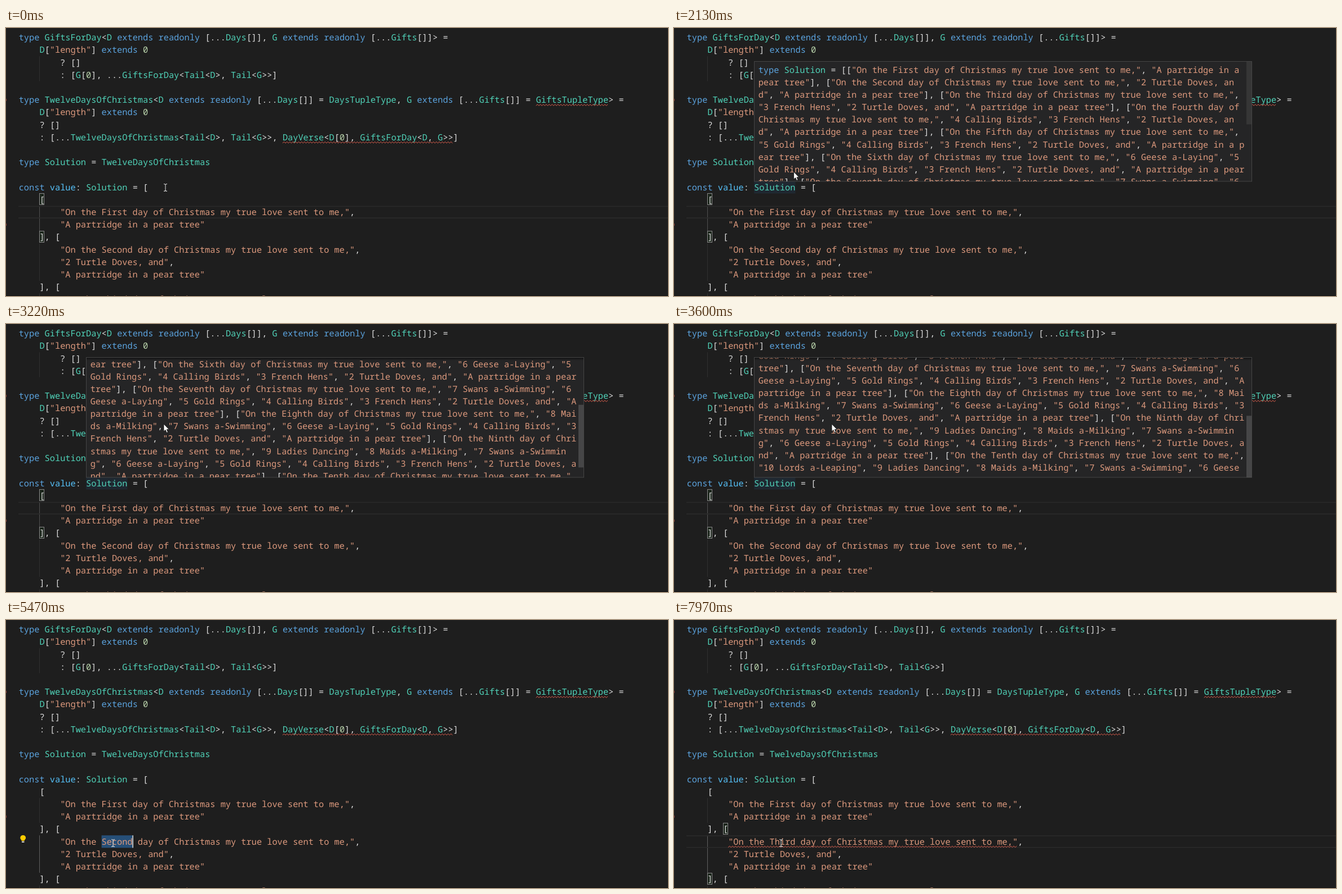
Animation, 1175 px wide and 477 px high, one loop 8 s. Source, as an HTML page:

```html
<!DOCTYPE html>
<html lang="en">
<head>
<meta charset="utf-8">
<title>Typed verses</title>
<style>
html, body { margin: 0; width: 100%; height: 100%; overflow: hidden; background: #1e1e1e; }
svg { display: block; width: 1175px; height: 477px; }
text {
  font: 15.3px "Noto Sans Mono", "DejaVu Sans Mono", monospace;
  font-variant-ligatures: none;
  text-rendering: geometricPrecision;
  white-space: pre;
}
</style>
</head>
<body>
<svg id="stage" viewBox="0 0 1175 477" xmlns="http://www.w3.org/2000/svg">
  <defs>
    <clipPath id="popClip"><rect x="143" y="60" width="882" height="213"/></clipPath>
    <linearGradient id="fade" x2="0" y2="1">
      <stop stop-color="#000" stop-opacity=".5"/><stop offset="1" stop-color="#000" stop-opacity="0"/>
    </linearGradient>
  </defs>
  <rect width="1175" height="477" fill="#1e1e1e"/>
  <rect y="476" width="1175" height="1" fill="#111"/>
  <g id="back"></g>
  <g id="code"></g>
  <g id="front"></g>
  <g id="popup">
    <rect x="142.5" y="59.5" width="883" height="213.5" fill="#252526" stroke="#454545"/>
    <g clip-path="url(#popClip)">
      <g id="hint"></g>
      <rect id="shade" x="143" y="60" width="882" height="5" fill="url(#fade)"/>
      <rect id="thumb" x="1016" width="9" height="111.5" fill="#797979"/>
    </g>
  </g>
  <g id="beam" fill="none" stroke="#d4d4d4" stroke-width="1.1">
    <path d="M-3-6.5Q0-6.5 0-4.5V4.5Q0 6.5-3 6.5M3-6.5Q0-6.5 0-4.5M3 6.5Q0 6.5 0 4.5"/>
  </g>
  <path id="arrow" d="M0 0V13.2L3 10.5 5.2 15.4 7.4 14.4 5.3 9.7H9.4Z" fill="#fff" stroke="#111" stroke-width=".8"/>
</svg>
<script>
const $ = id => document.getElementById(id);
const LOOP = 8000, CW = 9.18, LH = 22.2, X0 = 22.7;
const colX = c => X0 + c * CW;
const rowY = r => 5.9 + r * LH;

function add(parent, tag, attrs) {
  const el = document.createElementNS('http://www.w3.org/2000/svg', tag);
  set(el, attrs);
  return parent.appendChild(el);
}
function set(el, attrs) { for (const k in attrs) el.setAttribute(k, attrs[k]); }
const show = (el, on) => set(el, { visibility: on ? 'visible' : 'hidden' });

// Syntax colours
const PLAIN = '#dcdcdc';
const RULES = [
  [/^"/, '#dc997d'],
  [/^(type|extends|readonly|const)$/, '#5ba3de'],
  [/^value$/, '#56c2fa'],
  [/^\d/, '#b9d3ab'],
  [/^[A-Z]/, '#50d2b8']
];
function colorize(src) {
  const out = [];
  for (const tok of src.match(/"[^"]*"?|\w+|[^\w"]+/g) || []) {
    const rule = RULES.find(([re]) => re.test(tok));
    for (const ch of tok) out.push([ch, rule ? rule[1] : PLAIN]);
  }
  return out;
}
function fillText(el, chars) {
  el.textContent = '';
  let span, last;
  for (const [ch, color] of chars) {
    if (color !== last) span = add(el, 'tspan', { fill: last = color });
    span.textContent += ch;
  }
}

// Verses
const ORDINALS = 'First Second Third Fourth Fifth Sixth Seventh Eighth Ninth Tenth'.split(' ');
const GIFTS = ['A partridge in a pear tree', '2 Turtle Doves, and', '3 French Hens', '4 Calling Birds',
  '5 Gold Rings', '6 Geese a-Laying', '7 Swans a-Swimming', '8 Maids a-Milking', '9 Ladies Dancing',
  '10 Lords a-Leaping'];
const opening = day => `"On the ${day} day of Christmas my true love sent to me,"`;
const pad = ' '.repeat(8);
const verseRow = day => pad + opening(day) + ',';
const tree = pad + `"${GIFTS[0]}"`;

const EDIT_ROW = 17;
const rows = [
  'type GiftsForDay<D extends readonly [...Days[]], G extends readonly [...Gifts[]]> =',
  '    D["length"] extends 0',
  '        ? []',
  '        : [G[0], ...GiftsForDay<Tail<D>, Tail<G>>]',
  '',
  'type TwelveDaysOfChristmas<D extends readonly [...Days[]] = DaysTupleType, G extends [...Gifts[]] = GiftsTupleType> =',
  '    D["length"] extends 0',
  '    ? []',
  '    : [...TwelveDaysOfChristmas<Tail<D>, Tail<G>>, DayVerse<D[0], GiftsForDay<D, G>>]',
  '',
  'type Solution = TwelveDaysOfChristmas',
  '',
  'const value: Solution = [',
  '    [',
  verseRow('First'),
  tree,
  '    ], [',
  verseRow('Second'),
  pad + `"${GIFTS[1]}",`,
  tree,
  '    ], [',
  verseRow('Third')
];
const rowEls = rows.map((src, r) => {
  const el = add($('code'), 'text', { x: X0, y: rowY(r) + 16.3 });
  fillText(el, colorize(src));
  return el;
});

// Hover text, wrapped between any two letters
const POP_W = 94, POP_LINES = 18, POP_LH = 22.13;
const verses = ORDINALS.map((day, i) =>
  '[' + [opening(day), ...GIFTS.slice(0, i + 1).reverse().map(g => `"${g}"`)].join(', ') + ']');
const hint = colorize('type Solution = [' + verses.join(', ') + ']');
const units = hint.map(c => c[0]).join('').match(/[\["]*[\w=]["\],-]*\s*/g);
const lines = [[]];
let at = 0;
for (const unit of units) {
  if (lines[lines.length - 1].length + unit.trimEnd().length > POP_W) lines.push([]);
  lines[lines.length - 1].push(...hint.slice(at, at += unit.length));
}
lines.slice(0, POP_LINES).forEach((chars, i) =>
  fillText(add($('hint'), 'text', { x: 149.7, y: 79.8 + i * POP_LH }), chars));

// Editor decorations
const back = $('back'), front = $('front');
const guide = (col, r0, r1) => add(back, 'rect',
  { x: Math.round(colX(col)), y: rowY(r0), width: 1, height: (r1 - r0) * LH, fill: '#303030' });
guide(4, 2, 4); guide(4, 21, 22);
const firstGuide = guide(4, 14, 16), secondGuide = guide(4, 17, 20);

const lineBox = add(back, 'path', { stroke: '#2a2a2a', 'stroke-width': 1.6, fill: 'none' });
const hoverBox = add(back, 'rect',
  { x: colX(13), y: rowY(12), width: 8 * CW, height: LH, fill: '#264f78', opacity: .22 });
const selection = add(back, 'rect',
  { x: colX(16), y: rowY(EDIT_ROW), width: 6 * CW, height: LH, fill: '#264f78' });

const bracket = (col, row) => add(back, 'rect', { x: Math.round(colX(col)) + .5, y: Math.round(rowY(row)) + .5,
  width: 8, height: 20, fill: '#0064001a', stroke: '#888' });
const firstPair = [bracket(4, 13), bracket(4, 16)];
const secondPair = [bracket(7, 16), bracket(4, 20)];

function wave(col, row, len) {
  const y = rowY(row) + LH - 3.2, end = colX(col + len);
  let d = '', up = false;
  for (let x = colX(col); x <= end; x += 2.6, up = !up)
    d += (d ? 'L' : 'M') + x.toFixed(1) + ' ' + (y + (up ? 0 : 2.4)).toFixed(1);
  return d;
}
const squiggle = d => add(front, 'path', { d, fill: 'none', stroke: '#e2604f', 'stroke-width': 1 });
squiggle(wave(100, 5, 14));
squiggle(wave(51, 8, 33));
const editWave = squiggle('');

for (const y of [126, 348]) add(front, 'rect', { y, width: 1, height: 4, fill: '#8a3a33' });
const caret = add(front, 'rect', { y: rowY(EDIT_ROW), width: 1.6, height: LH, fill: '#d4d4d4' });
const bulb = add(front, 'g', {});
add(bulb, 'path', { d: 'M27.8 393.2C27.8 391 25.3 390.5 25.3 387.8A4.9 4.9 0 0 1 35.1 387.8C35.1 390.5 32.6 391 32.6 393.2Z', fill: '#fc0' });
add(bulb, 'rect', { x: 28, y: 394, width: 4.4, height: 2, fill: '#d4d4d4' });

// Pointer path: start, end, steps, x, y, lift
const MOVES = [
  [120, 880, 11, 189, 284, 10],
  [2050, 2430, 6, 280, 176, 0],
  [3220, 3220, 1, 280, 178, 0],
  [4080, 4310, 4, 239, 356, 0],
  [4380, 4530, 3, 182, 414, 0],
  [4690, 4840, 3, 190, 397, 0]
];
function pointer(t) {
  let x = 283, y = 284;
  for (const [t0, t1, n, tx, ty, lift] of MOVES) {
    if (t < t0) break;
    const step = n > 1 ? Math.floor((t - t0) / (t1 - t0) * (n - 1) + 1e-6) + 1 : 1;
    const p = Math.min(1, step / n), e = p * p * (3 - 2 * p);
    x += (tx - x) * e;
    y += (ty - y) * e - lift * Math.sin(Math.PI * p);
  }
  return [x, y];
}

const latest = (t, table, first) => table.reduce((v, [at, next]) => t >= at ? next : v, first);
const SCROLL = [[2680, 52.7], [2900, 105.4], [3050, 158.1], [3600, 195]];
const TYPED = [[6640, 'T'], [7020, 'Th'], [7100, 'Thi'], [7260, 'Thir'], [7410, 'Third']];
const POP_IN = 1200, POP_OUT = 4230, CLICK = 5010, SELECT = 5160, TYPE = 6640;
let shown = 'Second';

function draw(t) {
  const within = (a, b) => t >= a && t < b;

  const word = latest(t, TYPED, 'Second');
  if (word !== shown) fillText(rowEls[EDIT_ROW], colorize(verseRow(shown = word)));

  const popped = within(POP_IN, POP_OUT), scroll = latest(t, SCROLL, 0);
  show($('popup'), popped);
  show(hoverBox, popped);
  set($('popup'), { opacity: t < 1280 ? .82 : 1 });
  set($('hint'), { transform: `translate(0 ${-scroll})` });
  set($('shade'), { opacity: scroll ? 1 : 0 });
  set($('thumb'), { y: 60 + scroll * .53, opacity: t < 2280 ? .2 : .4 });

  const clicked = t >= CLICK, selected = within(SELECT, TYPE);
  const y = rowY(clicked ? EDIT_ROW : 14);
  set(lineBox, { d: `M22 ${y + .8}H1175M22 ${y + LH - .8}H1175` });
  show(lineBox, !selected);
  show(selection, selected);
  set(firstGuide, { fill: clicked ? '#303030' : '#505050' });
  set(secondGuide, { fill: clicked ? '#606060' : '#303030' });
  firstPair.forEach(el => show(el, !clicked));
  secondPair.forEach(el => show(el, within(CLICK, 5240) || t >= 6710));
  show(bulb, within(5470, 6940));

  const caretCol = t < SELECT ? 18 : 16 + word.length;
  set(caret, { x: colX(caretCol) - .3 });
  show(caret, clicked && !within(5700, 6160) && t < 7880);
  show(editWave, t >= 6940);
  set(editWave, { d: wave(8, EDIT_ROW, opening(word).length) });

  const [px, py] = pointer(t);
  const overPopup = popped && py < 273;
  show($('arrow'), overPopup);
  show($('beam'), !overPopup);
  for (const id of ['arrow', 'beam']) set($(id), { transform: `translate(${px} ${py})` });
}

const start = performance.now();
function tick() {
  draw((performance.now() - start) % LOOP);
  requestAnimationFrame(tick);
}
tick();
</script>
</body>
</html>
```
